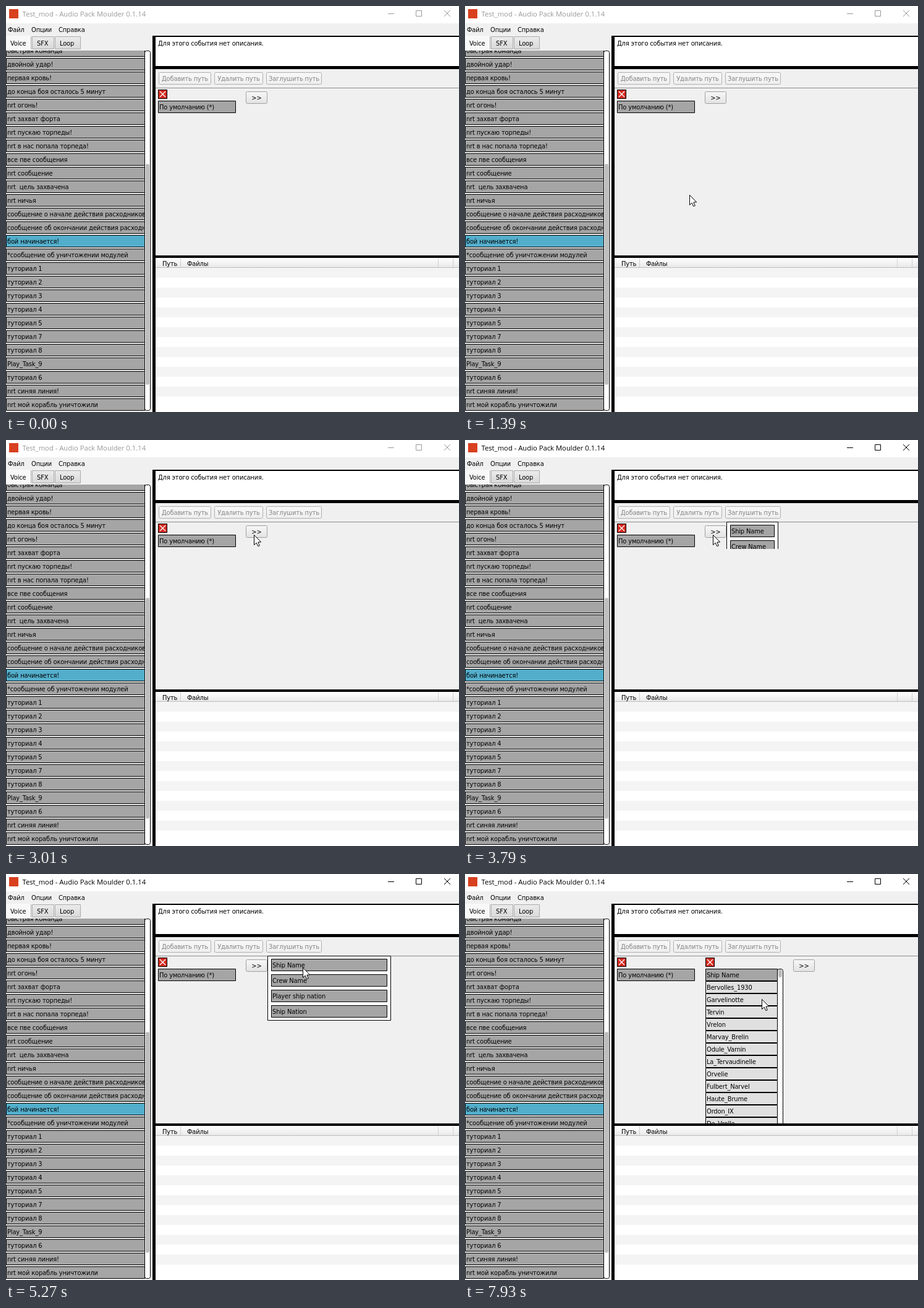
Recreate the animation shown at these times as an HTML page with a canvas. Size 733x656 px, loop 7.99 s.

```html
<!DOCTYPE html>
<html lang="ru">
<head>
<meta charset="utf-8">
<title>Audio Pack Moulder</title>
<style>
html, body { margin: 0; width: 100%; height: 100%; overflow: hidden; background: #f0f0f0; }
canvas { display: block; }
</style>
</head>
<body>
<canvas id="stage" width="733" height="656"></canvas>
<script>
const ctx = document.getElementById('stage').getContext('2d');
const LOOP = 7990;
const UI_FONT = '11px "DejaVu Sans Condensed", "Liberation Sans", sans-serif';
const TITLE_FONT = '11.25px "Open Sans", "Noto Sans", sans-serif';
const GREY = '#a5a5a5', PALE = '#e0e0e0', PANEL = '#f0f0f0', BLUE = '#53aecb';

const POPUP_STEPS = [3640, 3710, 3790, 3870, 3960];
const COLUMN_AT = 6290;
const CLICKS = [[3640, 3710], [6140, COLUMN_AT]];

const EVENTS = ['быстрая команда', 'двойной удар!', 'первая кровь!', 'до конца боя осталось 5 минут',
  'nrt огонь!', 'nrt захват форта', 'nrt пускаю торпеды!', 'nrt в нас попала торпеда!',
  'все пве сообщения', 'nrt сообщение', 'nrt  цель захвачена', 'nrt ничья',
  'сообщение о начале действия расходников', 'сообщение об окончании действия расходников',
  'бой начинается!', '*сообщение об уничтожении модулей', 'туториал 1', 'туториал 2', 'туториал 3',
  'туториал 4', 'туториал 5', 'туториал 7', 'туториал 8', 'Play_Task_9', 'туториал 6',
  'nrt синяя линия!', 'nrt мой корабль уничтожили'];
const SELECTED = 14;
const OPTIONS = ['Ship Name', 'Crew Name', 'Player ship nation', 'Ship Nation'];
const SHIPS = ['Bervolles_1930', 'Garvelinotte', 'Tervin', 'Vrelon', 'Marvay_Brelin', 'Odule_Varnin',
  'La_Tervaudinelle', 'Orvelie', 'Fulbert_Narvel', 'Haute_Brume', 'Ordon_IX', 'De_Vrolle'];

// Pointer moves: start, end, number of steps, then [progress, x, y] points.
const MOVES = [
  [290, 1070, 11, [[0, 625, 668], [.09, 617, 640], [.3, 535, 535], [.6, 440, 425], [.8, 398, 386], [1, 385, 373]]],
  [1150, 1940, 11, [[0, 385, 373], [.18, 371, 340], [.364, 363, 305], [.65, 366, 268], [1, 381, 233]]],
  [2000, 2630, 9, [[0, 381, 233], [.4, 393, 185], [.75, 402, 145], [1, 400, 154]]],
  [3010, 3010, 1, [[0, 400, 154], [1, 401, 153]]],
  [4660, 5270, 9, [[0, 401, 153], [.35, 428, 147], [.7, 464, 146], [1, 480, 151]]],
  [7380, 7930, 8, [[0, 480, 151], [.5, 480, 177], [1, 480, 202]]]
];

function rect(x, y, w, h, color) {
  ctx.fillStyle = color;
  ctx.fillRect(x, y, w, h);
}

function outline(x, y, w, h, color, radius = 0) {
  ctx.strokeStyle = color;
  ctx.lineWidth = 1;
  ctx.beginPath();
  ctx.roundRect(x + .5, y + .5, w - 1, h - 1, radius);
  ctx.stroke();
}

function text(str, x, y, color = '#000', font = UI_FONT) {
  ctx.font = font;
  ctx.letterSpacing = font === UI_FONT ? '-0.15px' : '0px';
  ctx.fillStyle = color;
  ctx.fillText(str, x, y);
}

function line(points, color, width = 1) {
  ctx.strokeStyle = color;
  ctx.lineWidth = width;
  ctx.beginPath();
  points.forEach(([x, y]) => ctx.lineTo(x, y));
  ctx.stroke();
}

function clipped(x, y, w, h, draw) {
  ctx.save();
  ctx.beginPath();
  ctx.rect(x, y, w, h);
  ctx.clip();
  draw();
  ctx.restore();
}

function gradient(y, h, top, bottom) {
  const fill = ctx.createLinearGradient(0, y, 0, y + h);
  fill.addColorStop(0, top);
  fill.addColorStop(1, bottom);
  return fill;
}

function item(label, x, y, w, fill) {
  rect(x, y, w, 20, fill);
  clipped(x, y, w, 20, () => text(label, x + 2, y + 14));
  outline(x, y, w, 20, '#000');
}

function button(label, x, y, w, h, enabled) {
  rect(x + 1, y + 1, w - 2, h - 2, gradient(y, h, '#f8f8f8', enabled ? '#e2e2e2' : '#eeeeee'));
  outline(x, y, w, h, enabled ? '#a0a0a0' : '#b0b0b0', 2);
  ctx.textAlign = 'center';
  text(label, x + w / 2, y + h / 2 + 4, enabled ? '#000' : '#858585');
  ctx.textAlign = 'left';
}

function closeIcon(x, y) {
  rect(x, y, 15, 15, '#d42a20');
  outline(x, y, 15, 15, '#000');
  line([[x + 3, y + 3], [x + 12, y + 12]], '#fff', 1.3);
  line([[x + 12, y + 3], [x + 3, y + 12]], '#fff', 1.3);
}

function titleBar(active) {
  const color = active ? '#000' : '#999';
  rect(0, 0, 733, 28, '#fff');
  rect(5, 5, 15, 15, '#d8401f');
  text('Test_mod - Audio Pack Moulder 0.1.14', 26.5, 17, color, TITLE_FONT);
  rect(618, 12, 10, 1, color);
  outline(663, 7, 10, 10, color);
  line([[709, 7], [719, 17]], color);
  line([[719, 7], [709, 17]], color);
  text('Файл', 3, 42);
  text('Опции', 41, 42);
  text('Справка', 85, 42);
}

function tab(label, x, w) {
  rect(x, 49, w, 20, gradient(49, 20, '#ececec', '#d9d9d9'));
  outline(x, 49, w, 21, '#acacac');
  text(label, x + 8, 64);
}

function eventList() {
  rect(0, 48, 237, 24, PANEL);
  tab('SFX', 42, 36);
  tab('Loop', 79, 42);
  rect(0, 48, 41, 23, '#f8f8f8');
  rect(40, 49, 1, 21, '#acacac');
  text('Voice', 7, 64);
  rect(0, 71, 237, 585, PANEL);
  clipped(0, 72, 225, 584, () => {
    EVENTS.forEach((label, i) => item(label, 0, 62 + 22 * i, 225, i === SELECTED ? BLUE : GREY));
  });
  ctx.fillStyle = '#fff';
  ctx.fillRect(225, 73, 9, 580);
  outline(224, 72, 10, 582, '#000', 3);
  ctx.fillStyle = '#bcbcbc';
  ctx.beginPath();
  ctx.roundRect(226, 255, 6, 357, 3);
  ctx.fill();
}

function fileTable() {
  rect(242, 407, 491, 249, '#fff');
  rect(242, 407, 491, 15, gradient(407, 15, '#fff', '#e9e9e9'));
  rect(242, 422, 491, 1, '#bdbdbd');
  [282, 699, 723].forEach(x => rect(x, 408, 1, 14, '#d0d0d0'));
  text('Путь', 253, 420);
  text('Файлы', 293, 420);
  for (let y = 423; y < 631; y += 32) rect(242, y, 491, 16, '#f4f4f4');
}

function rightPane() {
  rect(237, 48, 496, 608, '#000');
  rect(242, 50, 491, 47, '#fff');
  text('Для этого события нет описания.', 246, 64);
  rect(242, 102, 491, 301, PANEL);
  rect(242, 132, 491, 1, '#8c8c8c');
  button('Добавить путь', 247, 107, 85, 20, false);
  button('Удалить путь', 337, 107, 79, 20, false);
  button('Заглушить путь', 421, 107, 90, 20, false);
  closeIcon(246, 135);
  item('По умолчанию (*)', 246, 153, 126, GREY);
  fileTable();
}

function popup(t) {
  const shownAt = POPUP_STEPS.filter(step => step <= t).pop();
  const scale = Math.min(1, (shownAt - 3667) / 293);
  if (!(scale > 0)) return;
  const w = Math.round(200 * scale), h = Math.round(105 * scale);
  clipped(423, 132, w, h, () => {
    rect(423, 132, w, 105, '#fff');
    OPTIONS.forEach((label, i) => item(label, 429, 137 + 25 * i, w - 12, GREY));
    outline(423, 132, w, 105, '#000');
  });
}

function shipColumn() {
  closeIcon(389, 135);
  clipped(389, 153, 127, 250, () => {
    rect(506, 153, 9, 250, '#fff');
    outline(505, 153, 10, 260, '#000', 3);
    ctx.fillStyle = '#bcbcbc';
    ctx.beginPath();
    ctx.roundRect(507, 154, 6, 13, 3);
    ctx.fill();
    item('Ship Name', 389, 153, 117, GREY);
    SHIPS.forEach((label, i) => item(label, 389, 173 + 20 * i, 117, PALE));
  });
}

function pointerAt(t) {
  const move = MOVES.filter(m => m[0] <= t).pop();
  if (!move) return null;
  const [start, end, steps, points] = move;
  const done = end > start ? Math.floor((t - start) / (end - start) * (steps - 1) + 1e-6) : 0;
  const p = Math.min(1, (done + 1) / steps);
  const next = Math.max(1, points.findIndex(point => point[0] >= p));
  const a = points[next - 1], b = points[next];
  const k = (p - a[0]) / (b[0] - a[0]);
  return [1, 2].map(i => Math.round(a[i] + (b[i] - a[i]) * k));
}

function circle(x, y, radius, color) {
  ctx.strokeStyle = color;
  ctx.lineWidth = 1;
  ctx.beginPath();
  ctx.arc(x, y, radius, 0, Math.PI * 2);
  ctx.stroke();
}

function pointer(t) {
  const tip = pointerAt(t);
  if (!tip) return;
  const [x, y] = tip;
  if (CLICKS.some(([from, to]) => t >= from && t < to)) {
    circle(x + .5, y + .5, 11.5, '#000');
    circle(x + .5, y + .5, 10.5, '#fff');
  }
  ctx.beginPath();
  [[0, 0], [0, 16], [3.7, 12.6], [6.3, 18.2], [8.8, 17.2], [6.4, 11.6], [11.2, 11.4]]
    .forEach(([dx, dy]) => ctx.lineTo(x + .5 + dx, y + .5 + dy));
  ctx.closePath();
  ctx.fillStyle = '#fff';
  ctx.fill();
  ctx.strokeStyle = '#000';
  ctx.lineWidth = 1;
  ctx.stroke();
}

function draw(t) {
  const hasColumn = t >= COLUMN_AT;
  rect(0, 0, 733, 656, PANEL);
  titleBar(t >= POPUP_STEPS[0]);
  eventList();
  rightPane();
  button('>>', hasColumn ? 531 : 388, 138, 35, 20, true);
  if (hasColumn) shipColumn();
  else popup(t);
  pointer(t);
}

const startTime = performance.now();
function tick() {
  draw((performance.now() - startTime) % LOOP);
  requestAnimationFrame(tick);
}
tick();
</script>
</body>
</html>
```
